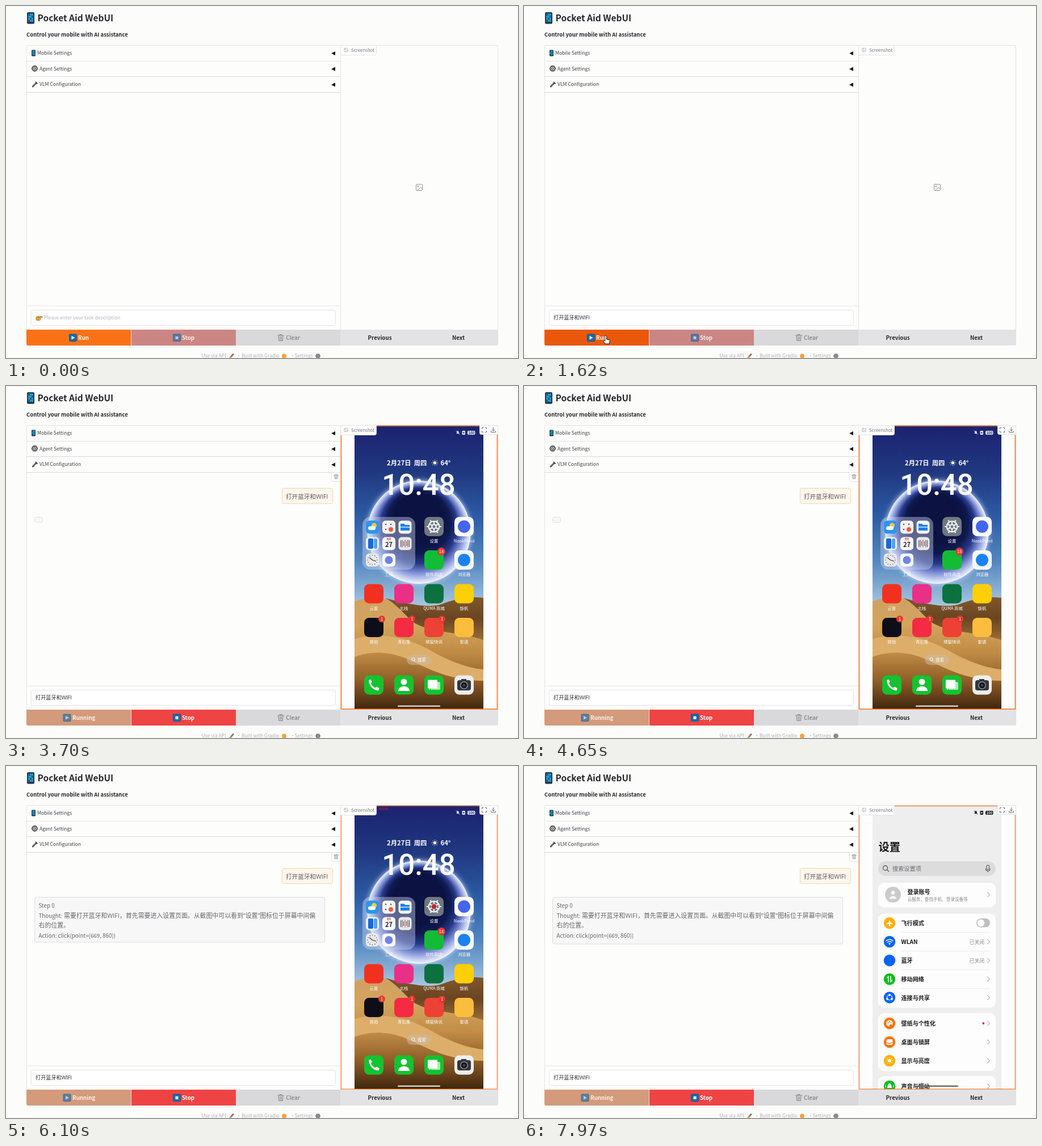
Recreate the animation shown at these times as an HTML page with a canvas. Size 902x621 px, loop 8000 ms.

```html
<!DOCTYPE html>
<html lang="en">
<head>
<meta charset="utf-8">
<title>Mobile assistant panel</title>
<style>
html, body { margin: 0; width: 100%; height: 100%; overflow: hidden; background: #fcfcfb; }
canvas { display: block; width: 902px; height: 621px; }
</style>
</head>
<body>
<canvas id="stage"></canvas>
<script>
const W = 902, H = 621, LOOP = 8000;
const canvas = document.getElementById('stage');
const dpr = window.devicePixelRatio || 1;
canvas.width = W * dpr;
canvas.height = H * dpr;
const c = canvas.getContext('2d');

const UI = '"Noto Sans CJK SC", "Noto Sans CJK", sans-serif';
const MIXED = '"Open Sans", "Noto Sans CJK SC", "Noto Sans CJK", sans-serif';
const CLOCK = 'Roboto, sans-serif';
const LINE = '#e4e4e7', INK = '#27272a', GREY = '#8b8b93';
const TASK = '打开蓝牙和WIFI';

// Moments of the story, in seconds
const PASTE = 0.45, ARRIVE = 1.0, CLICK = 1.75, LEAVE = 2.05, SHOT = 2.9, REPLY = 5.5, SETTINGS = 6.4;

function text(s, x, y, size, color = INK, weight = 400, align = 'left', font = UI) {
  c.font = `${weight} ${size}px ${font}`;
  c.fillStyle = color;
  c.textAlign = align;
  c.fillText(s, x, y + size * 0.36);
}
function rect(x, y, w, h, fill) {
  c.fillStyle = fill;
  c.fillRect(x, y, w, h);
}
function round(x, y, w, h, r, fill, stroke, lw = 1) {
  c.beginPath();
  c.roundRect(x, y, w, h, r);
  paint(fill, stroke, lw);
}
function disc(x, y, r, fill, stroke, lw = 1) {
  c.beginPath();
  c.arc(x, y, r, 0, Math.PI * 2);
  paint(fill, stroke, lw);
}
function path(d, x, y, fill, stroke, lw = 1) {
  c.save();
  c.translate(x, y);
  const p = new Path2D(d);
  if (fill) { c.fillStyle = fill; c.fill(p); }
  if (stroke) {
    c.strokeStyle = stroke;
    c.lineWidth = lw;
    c.lineCap = c.lineJoin = 'round';
    c.stroke(p);
  }
  c.restore();
}
function paint(fill, stroke, lw) {
  if (fill) { c.fillStyle = fill; c.fill(); }
  if (stroke) { c.strokeStyle = stroke; c.lineWidth = lw; c.stroke(); }
}
function stops(g, colors) {
  colors.forEach((s, i) => g.addColorStop(i / (colors.length - 1), s));
  return g;
}
function grad(y0, y1, ...colors) {
  return stops(c.createLinearGradient(0, y0, 0, y1), colors);
}
function gear(x, y, r, color, lw) {
  disc(x, y, r * 0.72, null, color, lw);
  disc(x, y, r * 0.28, null, color, lw);
  c.strokeStyle = color;
  c.lineWidth = lw;
  c.beginPath();
  for (let i = 0; i < 12; i++) {
    const a = i * Math.PI / 6, q = i % 2 ? 0.3 : 0.75, e = i % 2 ? 0.7 : 1;
    c.moveTo(x + Math.cos(a) * r * q, y + Math.sin(a) * r * q);
    c.lineTo(x + Math.cos(a) * r * e, y + Math.sin(a) * r * e);
  }
  c.stroke();
}

function phoneEmoji(x, y, w, h) {
  round(x, y, w, h, w * 0.15, '#26323a');
  const sw = w * 0.74, sh = h * 0.74, sx = x + w * 0.13, sy = y + h * 0.1;
  rect(sx, sy, sw, sh, '#0b79b4');
  for (let i = 0; i < 3; i++)
    for (let j = 0; j < 4; j++)
      rect(sx + sw * (0.1 + i * 0.3), sy + sh * (0.07 + j * 0.24), sw * 0.2, sh * 0.14, (i + j) % 3 ? '#38b8e6' : '#0f4b72');
}
function pictureIcon(x, y, s, color) {
  round(x - s / 2, y - s / 2, s, s, s * 0.12, null, color, s * 0.09);
  disc(x - s * 0.2, y - s * 0.18, s * 0.11, null, color, s * 0.08);
  path(`M${-s * 0.3} ${s * 0.45}L${s * 0.2} ${-s * 0.02}L${s * 0.48} ${s * 0.24}`, x, y, null, color, s * 0.09);
}
function trash(x, y, s, color) {
  path(`M${-s} ${-s * 0.7}H${s}M${-s * 0.35} ${-s * 0.75}V${-s}H${s * 0.35}V${-s * 0.75}M${-s * 0.75} ${-s * 0.7}L${-s * 0.6} ${s}H${s * 0.6}L${s * 0.75} ${-s * 0.7}M${-s * 0.2} ${-s * 0.3}V${s * 0.6}M${s * 0.2} ${-s * 0.3}V${s * 0.6}`, x, y, null, color, s * 0.2);
}
function keyEmoji(x, y, stop) {
  round(x, y, 13, 12.5, 1, '#0a6fb5', '#234f70', 1);
  if (stop) rect(x + 4, y + 3.8, 5, 5, '#fff');
  else path('M4 3L10 6.3L4 9.6Z', x, y, '#fff');
}

function header() {
  phoneEmoji(37, 11, 13, 20.5);
  text('Pocket Aid WebUI', 55.5, 21.5, 15.5, INK, 700);
  text('Control your mobile with AI assistance', 36, 51, 9.5, INK, 700);
}

function accordion() {
  const rows = [['Mobile Settings', 55], ['Agent Settings', 59], ['VLM Configuration', 59]];
  rows.forEach(([name, x], i) => {
    const y = 83 + i * 27.7;
    text(name, x, y, 8.55, '#3f3f46');
    path('M0 0L7 -3.6V3.6Z', 573, y + 0.5, '#18181b');
    rect(36, Math.round(y + 13.5), 553, 1, i ? '#d9d9de' : LINE);
  });
  phoneEmoji(45, 77.5, 7, 11);
  gear(50.5, 110.3, 5.5, '#3a3a3e', 1);
  disc(50.5, 110.3, 4.9, null, '#3a3a3e', 1);
  path('M-3.3 3.5L3 -2.8', 50.5, 138.5, null, '#333', 2.6);
  path('M-3.3 3.5L3 -2.8', 50.5, 138.5, null, '#c4c8cc', 0.8);
  path('M2 -4.6L2.3 -2L5 -1.8', 50.5, 138.5, null, '#333', 1.3);
}

function pointing(x, y) {
  round(x, y, 5.5, 6.5, 2, '#f3ae2f', '#6a4a16', 0.7);
  round(x + 3.5, y - 0.5, 7.5, 2.6, 1.3, '#f9c23c', '#6a4a16', 0.7);
  round(x + 4, y + 2, 3.5, 4.5, 1.5, '#f9c23c', '#6a4a16', 0.6);
}

function inputBar(t) {
  rect(36, 528.5, 553, 1, '#e9e9e4');
  round(44.5, 536.5, 536, 27, 3, '#fff', LINE);
  if (t < PASTE) {
    pointing(53, 548);
    text('Please enter your task description', 67, 550, 8.55, '#b4b4bb');
  } else {
    text(TASK, 52, 550, 9.15, '#2b2b30', 400, 'left', MIXED);
  }
}

function buttons(t) {
  const running = t >= CLICK, hover = t > 0.88 && !running;
  c.save();
  c.beginPath();
  c.roundRect(36, 571, 831, 28, [0, 0, 3, 3]);
  c.clip();
  rect(36, 571, 184, 28, running ? '#d39a7b' : hover ? '#ea580c' : '#f97316');
  rect(220, 571, 1, 28, '#f4dcd2');
  rect(221, 571, 184, 28, running ? '#ef4444' : '#cb8684');
  rect(405, 571, 184, 28, '#d9d9db');
  rect(589, 571, 278, 28, '#e3e3e5');
  c.restore();
  const label = (s, x, color, align) => text(s, x, 585.5, 9.75, color, 700, align);
  c.globalAlpha = running ? 0.6 : 1;
  keyEmoji(running ? 101 : 111.5, 579, false);
  c.globalAlpha = running ? 1 : 0.6;
  keyEmoji(294.5, 579, true);
  c.globalAlpha = 1;
  label(running ? 'Running' : 'Run', running ? 117 : 127, running ? '#faf0ea' : '#fff');
  label('Stop', 310, running ? '#fff' : '#f7eceb');
  trash(484, 585, 5.4, '#88888c');
  label('Clear', 493, '#8e8e93');
  label('Previous', 658.5, INK, 'center');
  label('Next', 797, INK, 'center');
}

function footer() {
  const f = (s, x) => text(s, x, 617.3, 8.5, '#b2b2b9');
  f('Use via API', 344.5);
  f('·', 406);
  f('Built with Gradio', 415);
  f('·', 500.5);
  f('Settings', 508.5);
  path('M-3 3L2 -3', 398, 617.5, null, '#7c7c84', 2.8);
  disc(400, 615, 1.3, '#d9534a');
  disc(395.5, 620, 1.5, '#f4a640');
  disc(490, 617.5, 4, '#f7a33c');
  gear(549.5, 617.5, 4.5, '#77777d', 1.3);
}

function chat(t) {
  if (t < CLICK) return;
  round(573.5, 152.5, 16, 16, 2, '#fff', LINE);
  trash(581.5, 160, 3.8, '#80808a');
  round(486.5, 180.5, 89, 27, 3, '#fff6ec', '#f1d7b0');
  text(TASK, 493, 195, 10.6, '#5a5a5e', 400, 'left', MIXED);
  if (t < SHOT) return;
  if (t < REPLY) {
    round(50.5, 231.5, 14, 9, 3, '#f8f8f8', '#dedee2');
    return;
  }
  round(50.5, 231.5, 511, t < SETTINGS ? 79.5 : 82.5, 3, '#f7f7f7', '#dfdfe3');
  const ink = '#66666a';
  const cjk = (s, x, y) => text(s, x, y, 10.9, ink, 400, 'left', MIXED);
  text('Step 0', 57.5, 246, 9.8, ink);
  text('Thought:', 57.5, 264, 9.8, ink);
  cjk('需要打开蓝牙和WIFI，首先需要进入设置页面。从截图中可以看到“设置”图标位于屏幕中间偏', 102, 264);
  cjk('右的位置。', 57.5, 281.5);
  text('Action: click(point=(669, 860))', 57.5, 299.5, 9.8, ink);
}

function statusIcons(color, back) {
  path('M-2.5 2C-1.5 1 -2 -3 0 -3C2 -3 1.5 1 2.5 2Z', 796, 82, color);
  path('M-3 -3L3 3.5', 796, 82, null, color, 0.9);
  round(803.5, 79, 5.5, 7, 1, color);
  rect(805, 81.5, 2.5, 2, back);
  round(813, 79, 13.5, 7, 2, color);
  text('100', 819.7, 82.6, 6, back, 700, 'center');
}

function wallpaper() {
  rect(614, 70, 227, 500, grad(70, 390, '#1c2270', '#20377f', '#2c5ba4', '#5487c0', '#a9c8e0'));
  c.save();
  c.shadowColor = '#cfdcff';
  c.shadowBlur = 10;
  const glow = c.createRadialGradient(727, 234, 44, 727.5, 258, 91);
  disc(727.5, 258, 91, stops(glow, ['#0c1342', '#101a50', '#27398a', '#8597da', '#f3f6ff']));
  c.restore();
  const dune = (d, fill) => path(d, 614, 0, fill);
  dune('M0 380C26 370 48 372 70 380C110 398 160 384 227 372V570H0Z', grad(372, 570, '#d0a063', '#d3a45c', '#c08b45', '#8e5d27', '#40260e'));
  dune('M54 374C90 384 130 392 150 386C176 376 204 370 227 374V448C180 432 120 436 96 410C84 398 70 382 54 374Z', grad(372, 448, '#80582c', '#6a4522', '#9a6c36'));
  dune('M0 446C52 432 100 446 140 470C176 490 206 498 227 500V520C160 520 120 492 84 478C50 466 20 470 0 478Z', '#dcae69');
}

function tile(x, y, fill, s = 34) {
  round(x - s / 2, y - s / 2, s, s, s * 0.25, fill);
}
function badge(x, y, s) {
  disc(x, y, s.length > 1 ? 7 : 6, '#e8392e');
  text(s, x, y, 7.5, '#fff', 400, 'center');
}

function folder() {
  round(628, 231, 93, 93, 14, 'rgba(205,215,240,.42)');
  const xs = [645.5, 674.5, 703], ys = [249, 278, 307];
  const fills = ['#2b95f2', '#f4f4f4', '#f4f4f4', '#e9f2fb', '#fafafa', '#e8e8ec', '#e9e9eb', '#f8f8fa'];
  fills.forEach((f, i) => tile(xs[i % 3], ys[i / 3 | 0], f, 23));
  disc(648.5, 246, 4.5, '#ffc83a');
  round(638, 247.5, 13, 6.5, 3.2, '#fff');
  [[669, 244], [678, 244], [669, 253]].forEach(([x, y]) => disc(x, y, 1.3, '#555'));
  disc(678, 253, 4, '#ee5a3a');
  path('M-8 -6H-2L0 -4H8V6H-8Z', 703, 249, '#1c7fe8');
  rect(695, 248, 16, 2, '#9bd0ff');
  round(638, 269, 9, 18, 2, '#1767d8');
  round(648, 269, 6, 18, 2, '#4ba3f3');
  text('周四', 674.5, 271, 4, '#e54b3f', 700, 'center');
  text('27', 674.5, 280, 11, '#222', 700, 'center');
  for (let i = -3; i < 4; i++) {
    const h = 3 + 4 * Math.abs(Math.cos(i * 1.3));
    rect(702.5 + i * 2.5, 278 - h, 1.1, h * 2, i ? '#555' : '#e8396b');
  }
  for (let i = 0; i < 12; i++)
    disc(645.5 + Math.cos(i * Math.PI / 6) * 8.5, 307 + Math.sin(i * Math.PI / 6) * 8.5, 0.8, '#555');
  path('M-5 -4L0 0L6 2', 645.5, 307, null, '#333', 1.2);
  disc(674.5, 307, 7, '#6f83e8');
  text('工具', 674.5, 332, 7.5, 'rgba(255,255,255,.75)', 400, 'center');
}

function homeScreen(marked) {
  wallpaper();
  statusIcons('#dfe5f8', '#26306e');
  text('2月27日  周四', 671, 136, 11.3, '#fff', 700);
  disc(755.5, 135.5, 2.8, '#fff');
  for (let i = 0; i < 8; i++)
    disc(755.5 + Math.cos(i * Math.PI / 4) * 4.8, 135.5 + Math.sin(i * Math.PI / 4) * 4.8, 0.7, '#fff');
  text('64°', 765.5, 136, 11.3, '#fff', 700);
  text('10:48', 727, 174, 51, '#fff', 500, 'center', CLOCK);
  folder();
  const cols = [648, 701, 754, 807];
  const apps = [
    [2, 248, '#6f7780', '设置'], [3, 248, '#fafbff', 'NookPond'],
    [2, 307, '#12bd35', '软件商店'], [3, 307, '#f6f9ff', '浏览器'],
    [0, 366.5, '#f2301f', '云筐'], [1, 366.5, '#ea2f86', '北栈'], [2, 366.5, '#0c703f', 'QUMA 商城'], [3, 366.5, '#fdcf08', '饭帆'],
    [0, 426, '#0e0e18', '晃拍'], [1, 426, '#f42b42', '青石笺'], [2, 426, '#ee4136', '晴窗快讯'], [3, 426, '#fbbd3d', '絮语']
  ];
  for (const [i, y, fill, name] of apps) {
    tile(cols[i], y, fill);
    text(name, cols[i], y + 25.5, 7.4, '#fff', 400, 'center');
  }
  gear(754, 248, 13, '#eef1f4', 2.2);
  disc(807, 248, 11, '#4465ee');
  disc(807, 307, 11, '#1a83f0');
  badge(767, 292, '18');
  [662, 715, 768].forEach(x => badge(x, 411, '1'));
  round(706, 474, 43, 18, 9, 'rgba(205,190,170,.5)');
  disc(717.5, 482, 2.6, null, '#fff', 1);
  path('M2 2L4 4', 717.5, 482, null, '#fff', 1);
  text('搜索', 725, 483, 7.5, '#fff');
  ['#13c32f', '#13c32f', '#13c32f', '#eeeeef'].forEach((f, i) => tile(cols[i], 527.5, f));
  path('M-9 -8C-8 2 -1 9 8 10L10 6L5 3L2 5C-1 3 -4 0 -5 -3L-3 -6L-6 -10Z', 648, 527.5, '#fff');
  disc(701, 522, 5.5, '#fff');
  path('M-10 10C-10 -1 10 -1 10 10Z', 701, 528, '#fff');
  round(748, 522, 17, 14, 2, '#a5edae');
  path('M-11 -9H6V6H-5L-9 9V6H-11Z', 754, 527.5, '#fff');
  round(795, 519, 24, 18, 4, '#33353a');
  rect(802, 517, 9, 3, '#33353a');
  disc(807, 528, 6.2, '#17181c', '#a2a6ad', 1.3);
  disc(807, 528, 2, '#35507e');
  round(690, 563.5, 75, 2.5, 1.2, '#d7cfc5');
  if (marked) {
    disc(754, 248, 4.3, '#c6262d');
    text('#click', 656, 76, 6, '#c0103c', 700);
  }
}

function chevron(y) { path('M-2 -4L2 0L-2 4', 818.5, y, null, '#b9b9bd', 1.1); }
function card(y, h) { round(624, y, 207, h, 10, '#fdfdfd'); }

function rowGlyph(i, x, y) {
  const w = '#fff';
  const glyphs = [
    () => path('M0 -6L1.2 -1.5L6 1.5V2.6L1.2 1.3L.8 4.2L2.2 5.6H-2.2L-.8 4.2L-1.2 1.3L-6 2.6V1.5L-1.2 -1.5Z', x, y, w),
    () => {
      path('M-6 -1.5Q0 -6.5 6 -1.5M-3.8 1Q0 -2.2 3.8 1', x, y, null, w, 1.4);
      disc(x, y + 3.5, 1.5, w);
    },
    () => {},
    () => path('M-2 5V-5L-4.5 -2M2 -5V5L4.5 2', x, y, null, w, 1.5),
    () => {
      disc(x, y, 4.5, null, w, 1.2);
      [[0, -4.5], [-4, 2.5], [4, 2.5]].forEach(([a, b]) => disc(x + a, y + b, 1.9, w));
    },
    () => {
      disc(x, y, 5.8, w);
      [[-2.5, -1], [0, -3], [2.6, -1]].forEach(([a, b]) => disc(x + a, y + b, 1, '#ff7200'));
      disc(x + 2, y + 4, 2.4, '#ff7200');
    },
    () => {
      round(x - 5.5, y - 5, 11, 10, 2, w);
      path('M-4 1Q0 4 4 1', x, y, null, '#ff7200', 1.3);
    },
    () => {
      disc(x, y, 3, w);
      for (let k = 0; k < 8; k++)
        disc(x + Math.cos(k * Math.PI / 4) * 5.3, y + Math.sin(k * Math.PI / 4) * 5.3, 0.8, w);
    },
    () => {
      path('M-4.5 3C-3 2 -4 -5 0 -5C4 -5 3 2 4.5 3Z', x, y, w);
      path('M-7 -2V2M7 -2V2', x, y, null, w, 1);
    }
  ];
  glyphs[i]();
}

function settingsScreen() {
  rect(614, 70, 227, 500, '#eeeeef');
  statusIcons('#1c1c1e', '#f2f2f2');
  text('设置', 624.5, 143, 19.3, '#161618', 700);
  round(624, 168, 207, 26, 13, '#dcdcdd');
  disc(636.5, 180, 4, null, '#555', 1.3);
  path('M3 3L6 6', 636.5, 180, null, '#555', 1.3);
  text('搜索设置项', 649, 181, 10.2, '#6a6a6e');
  round(815, 175, 4.5, 8, 2.2, null, '#555', 1.1);
  path('M-4 0Q-4 4 0 4Q4 4 4 0M0 4V6', 817.3, 181, null, '#555', 1.1);
  card(206, 43.5);
  disc(650, 227, 14, '#cbcbcb');
  disc(650, 223.5, 3.4, '#f6f6f6');
  path('M-6 5C-6 -2 6 -2 6 5Z', 650, 229.5, '#f6f6f6');
  text('登录账号', 675.5, 222, 10, '#1b1b1d', 700);
  text('云服务、查找手机、登录设备等', 675.5, 235, 7.6, '#88888c');
  chevron(227);
  card(260.5, 166);
  card(436, 102);
  card(547, 40);
  const rows = [
    ['飞行模式', 277, '#ffb000'], ['WLAN', 310, '#0a64f5'], ['蓝牙', 343, '#0a64f5'],
    ['移动网络', 376, '#0ebd1c'], ['连接与共享', 408.5, '#0a64f5'],
    ['壁纸与个性化', 454, '#ff7200'], ['桌面与锁屏', 487, '#ff7200'], ['显示与亮度', 520, '#ffb000'],
    ['声音与振动', 565, '#0ebd1c']
  ];
  rows.forEach(([name, y, color], i) => {
    disc(644, y, 10.3, color);
    rowGlyph(i, 644, y);
    text(name, 664.5, y + 0.5, 10.1, '#1b1b1d', 700);
    if (i) chevron(y);
    if (i === 1 || i === 2) text('已关闭', 811, y + 0.5, 8.8, '#8a8a8e', 400, 'right');
    if (i < 4) rect(664, y + 16, 157, 1, '#ececee');
  });
  round(797, 269, 24, 15.5, 7.7, '#bfbfc2');
  disc(805, 276.8, 6.2, '#fff');
  disc(809.3, 454, 2, '#e02745');
  round(690, 563.5, 75, 2.5, 1.2, '#6d6f62');
}

function shotPanel(t) {
  if (t < SHOT) {
    pictureIcon(728, 320, 11, '#8e8e96');
  } else {
    c.save();
    c.beginPath();
    c.rect(591, 70, 275, 500);
    c.clip();
    rect(591, 70, 275, 500, '#fdfdfd');
    if (t < SETTINGS) homeScreen(t >= REPLY);
    else settingsScreen();
    c.restore();
  }
  if (t >= CLICK) {
    // Slow pulse of the busy outline
    const fadeIn = Math.min(1, (t - CLICK) / 0.4);
    c.globalAlpha = fadeIn * (0.78 + 0.22 * Math.cos(Math.PI * (t - 3.17)));
    c.strokeStyle = '#ee6f18';
    c.lineWidth = 2;
    c.strokeRect(590.5, 70.5, 275, 499.5);
    c.globalAlpha = 1;
  }
  round(589.5, 69.5, 63, 17, [0, 0, 3, 0], '#fdfdfd', LINE);
  pictureIcon(599, 77.5, 6.2, GREY);
  text('Screenshot', 608, 78, 7.9, '#77777f');
  if (t >= SHOT) {
    round(834.5, 69.5, 32, 16, [0, 0, 0, 3], '#fdfdfd', LINE);
    path('M-4 -1.8V-4H-1.8M1.8 -4H4V-1.8M4 1.8V4H1.8M-1.8 4H-4V1.8', 842.5, 77.5, null, '#6b6b73', 1);
    path('M0 -4V1.5M-2.5 -.8L0 1.6L2.5 -.8M-4 2V4H4V2', 858.5, 77.5, null, '#6b6b73', 1);
  }
}

function pointer(t) {
  if (t < 0.75 || t > LEAVE + 0.2) return;
  const ease = k => k * k * (3 - 2 * k);
  const clamp = k => Math.max(0, Math.min(1, k));
  const away = t < CLICK ? 1 - ease(clamp((t - 0.75) / (ARRIVE - 0.75))) : ease(clamp((t - CLICK - 0.1) / 0.3));
  const x = 144 + away * 30, y = 583 + away * 50;
  if (y < 599)
    path('M-1.5 0C-1.5 -2 1.5 -2 1.5 0V5L6 6C7 6 7.5 7 7.3 8L6.3 13H-.5L-4.5 8.5C-5 7 -3.5 6.5 -1.5 8Z', x, y, '#fff', '#111', 1);
  else
    path('M0 0V12L3 9.5L5 14L7 13L5 8.7H8.5Z', x, y, '#fff', '#111', 1);
}

function draw(t) {
  c.setTransform(dpr, 0, 0, dpr, 0, 0);
  rect(0, 0, W, H, '#fcfcfb');
  header();
  round(36.5, 69.5, 830, 529, 3, '#fdfdfc', LINE);
  rect(589, 70, 1, 501, LINE);
  accordion();
  chat(t);
  inputBar(t);
  buttons(t);
  shotPanel(t);
  footer();
  pointer(t);
}

const start = performance.now();
function tick() {
  draw((performance.now() - start) % LOOP / 1000);
  requestAnimationFrame(tick);
}
tick();
</script>
</body>
</html>
```
